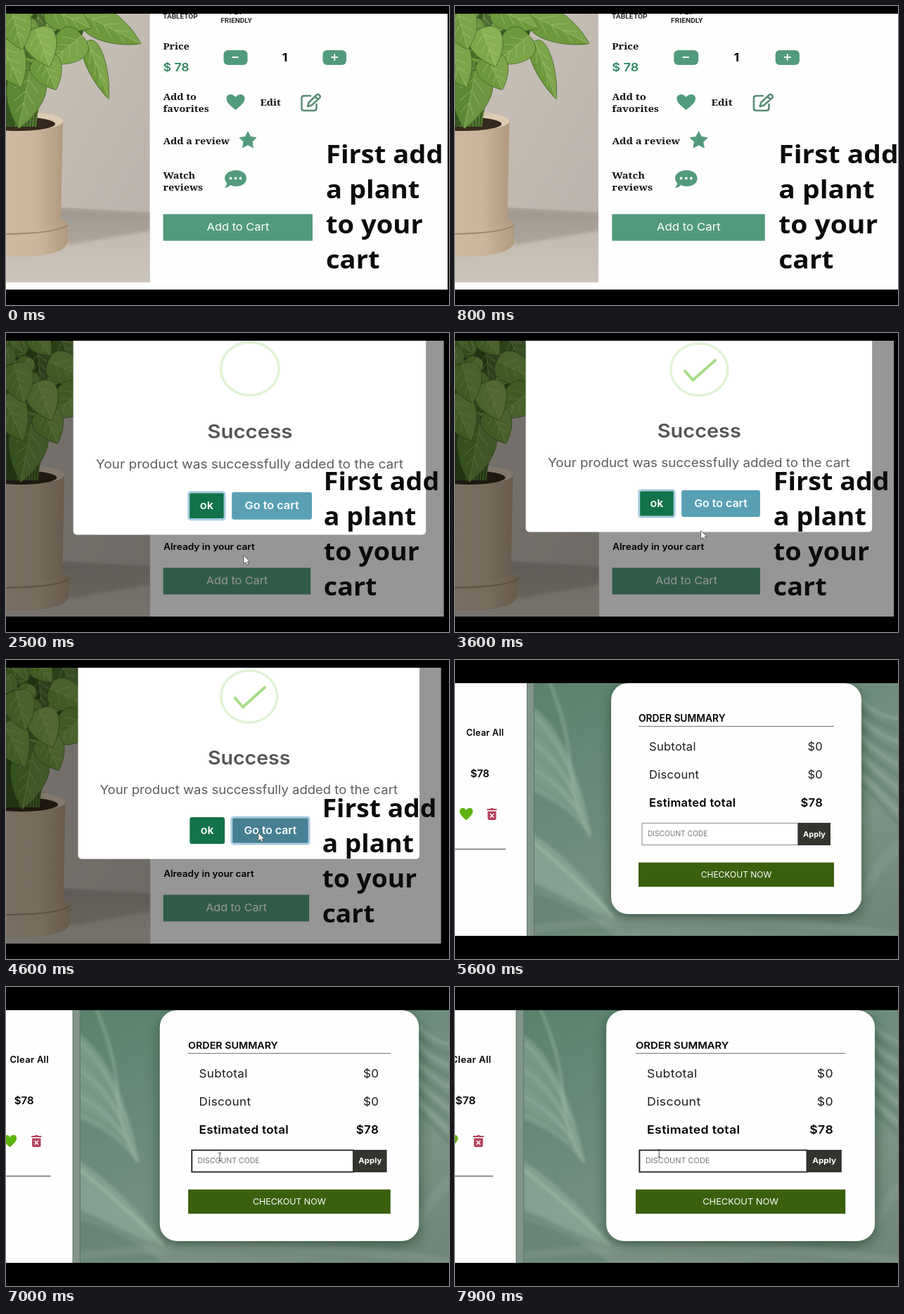
Recreate the animation shown at these times as an HTML page. Size 630 by 426 pixels, loop 8000 ms.

```html
<!DOCTYPE html>
<html lang="en">
<head>
<meta charset="utf-8">
<title>Plant shop</title>
<style>
  html, body { margin: 0; width: 100%; height: 100%; overflow: hidden; background: #000; }
  svg { display: block; }
  text { font-family: Inter, sans-serif; }
  #shop text { transform-box: fill-box; transform-origin: left; transform: scaleX(1.09); }
  #shop .mid text, #shop text.mid { transform-origin: center; }
  .serif text { font: bold 13.1px "Noto Serif", serif; fill: #111; }
  .tag text { font: bold 9.2px Roboto, sans-serif; fill: #2a2a2a; }
  .caption text { font: bold 35px "Open Sans", sans-serif; fill: #0b0b0b; }
  .mid { text-anchor: middle; }
  .end { text-anchor: end; }
  .bold { font-weight: 600; }
  .row { font-size: 16.5px; letter-spacing: .3px; fill: #1c1c1c; }
  .row .bold { fill: #000; }
</style>
</head>
<body>
<svg width="630" height="426" viewBox="0 0 630 426">
  <defs>
    <clipPath id="shopClip"><rect x="-30" y="11" width="658" height="393"/></clipPath>
    <clipPath id="cartClip"><rect x="-30" y="33" width="700" height="360"/></clipPath>
    <clipPath id="photoClip"><rect x="-30" y="-40" width="234.5" height="433.5"/></clipPath>
    <linearGradient id="wall" x1="0" x2="1" y1="0" y2="1">
      <stop offset="0" stop-color="#cdc6bd"/><stop offset="1" stop-color="#b9b1a9"/>
    </linearGradient>
    <linearGradient id="floor" x1="0" x2="0" y1="0" y2="1">
      <stop offset="0" stop-color="#b0a8a0"/><stop offset=".4" stop-color="#c4bcb2"/><stop offset="1" stop-color="#cbc4bb"/>
    </linearGradient>
    <linearGradient id="clay" x1="0" x2="1" y1="0" y2="0">
      <stop offset="0" stop-color="#cfbda4"/><stop offset=".65" stop-color="#c9b59b"/><stop offset="1" stop-color="#b09a80"/>
    </linearGradient>
    <linearGradient id="foliage" x1="0" x2="1" y1="0" y2="1">
      <stop offset="0" stop-color="#547f65"/><stop offset=".35" stop-color="#68897a"/>
      <stop offset=".7" stop-color="#7b9385"/><stop offset="1" stop-color="#6b8275"/>
    </linearGradient>
    <filter id="soft" x="-30%" y="-30%" width="160%" height="160%"><feGaussianBlur stdDeviation="2"/></filter>
    <filter id="cardShadow" x="-20%" y="-20%" width="140%" height="140%"><feGaussianBlur stdDeviation="9"/></filter>
    <path id="heart" d="M0 11C-5 7-13 1-13-5C-13-12-4-13 0-7C4-13 13-12 13-5C13 1 5 7 0 11Z"/>
  </defs>

  <g id="shop">
    <g clip-path="url(#shopClip)">
      <rect x="-30" y="10" width="660" height="394" fill="#fefefe"/>
      <g id="photo" clip-path="url(#photoClip)">
        <rect x="-30" y="-40" width="235" height="434" fill="url(#wall)"/>
        <path d="M-30 284L80 287L205 294V394H-30Z" fill="url(#floor)"/>
        <path d="M70 289L205 295V320L90 340Z" fill="#8d857d" opacity=".45" filter="url(#soft)"/>
        <path d="M-30 306H80Q88 306 88 314V336Q84 356 20 357H-30Z" fill="url(#clay)"/>
        <path d="M-30 325Q70 326 88 312" fill="none" stroke="#9c866c" stroke-width="2"/>
        <path d="M-30 163H81L78 306Q60 321-30 322Z" fill="url(#clay)"/>
        <ellipse cx="20" cy="164" rx="61" ry="13.500" fill="#dccbb5"/>
        <ellipse cx="18" cy="168" rx="52" ry="10" fill="#35281d"/>
        <g id="plant"></g>
      </g>

      <g class="tag mid">
        <text x="248" y="18.5">TABLETOP</text>
        <text x="327" y="12.5">PET</text>
        <text x="327.5" y="24.5">FRIENDLY</text>
      </g>
      <g class="serif">
        <text x="223.5" y="62">Price</text>
        <text x="223.5" y="134">Add to</text>
        <text x="223.5" y="151">favorites</text>
        <text x="361.5" y="142">Edit</text>
        <text x="223.5" y="197">Add a review</text>
        <text x="223.5" y="246">Watch</text>
        <text x="223.5" y="263">reviews</text>
      </g>
      <text x="223.5" y="93" class="bold" font-size="16.200" fill="#2f8560">$ 78</text>
      <text x="396.5" y="79" class="mid" font-weight="700" font-size="16">1</text>
      <g fill="#529a7c">
        <rect x="309.5" y="63" width="34" height="21" rx="6"/>
        <rect x="450.5" y="63" width="33.5" height="21" rx="6"/>
        <use href="#heart" x="326.5" y="137"/>
        <path id="star" stroke="#529a7c" stroke-linejoin="round"/>
        <path d="M327 234C336 234 342 239 342 245.500C342 252 336 257 327 257Q322 257 319 255Q316 259 311 259Q314 256 314 252Q311 249 311 245.500C311 239 318 234 327 234Z"/>
      </g>
      <path d="M321.500 73H330.500M462.500 73H472M467.250 68.300V77.700" stroke="#fff" stroke-width="1.800"/>
      <g fill="#fff"><circle cx="319.500" cy="245.500" r="1.900"/><circle cx="326.500" cy="245.500" r="1.900"/><circle cx="333.500" cy="245.500" r="1.900"/></g>
      <g fill="none" stroke="#5a8c76" stroke-width="2.500" stroke-linejoin="round">
        <path d="M434 128H424Q420.500 128 420.500 131V146Q420.500 149 424 149H438Q441.500 149 441.500 146V139"/>
        <path d="M429 143L430.500 137.500L442 126.500Q443.500 125 445 126.500L446.500 128Q447.500 129.500 446 131L434.500 141.500ZM439.500 129L443.500 133"/>
      </g>

      <text id="already" x="224" y="309.500" class="bold" font-size="12.700">Already in your cart</text>
      <rect id="addButton" x="223.500" y="296.500" width="212.500" height="38" fill="#529a7c"/>
      <g id="addLabel"><text x="330" y="320.500" class="mid" font-size="15.100" fill="#fff">Add to Cart</text></g>

      <rect id="shade" x="-30" y="10" width="660" height="394"/>
      <g id="modal">
        <rect x="99.300" y="-93" width="497.500" height="376.500" rx="5" fill="#fff"/>
        <ellipse cx="348.500" cy="52" rx="41" ry="37" fill="none" stroke="#e1f3d6" stroke-width="3.500"/>
        <path id="tick" d="M327 53L339.500 67L372.500 38" pathLength="1" stroke-dasharray="1 2" fill="none" stroke="#a5dc86" stroke-width="4"/>
        <text x="348.500" y="149" class="bold mid" font-size="26.800" fill="#555">Success</text>
        <text x="348" y="191" class="mid" font-size="17.400" fill="#5c5c5c">Your product was successfully added to the cart</text>
        <rect id="okButton" x="262" y="224" width="51" height="38" rx="3" fill="#12724a" stroke="#a9cbe0"/>
        <rect id="goButton" x="323" y="224" width="113" height="38" rx="3" stroke="#a9cbe0"/>
        <g class="bold mid" font-size="14.800" fill="#fff">
          <text x="287.500" y="248">ok</text>
          <text x="379.500" y="248">Go to cart</text>
        </g>
      </g>
      <path id="arrow" d="M0 0V12L3 9.500L5 13.500L7 12.500L5.200 8.800H9Z" fill="#fff" stroke="#444" stroke-width=".8"/>
    </g>
    <g class="caption">
      <text x="455" y="224">First add</text>
      <text x="455" y="274">a plant</text>
      <text x="455" y="324">to your</text>
      <text x="455" y="374">cart</text>
    </g>
  </g>

  <g id="cart">
    <g clip-path="url(#cartClip)">
      <rect x="-30" y="33" width="700" height="360" fill="url(#foliage)"/>
      <g id="fronds" filter="url(#soft)"></g>
      <rect x="101" y="33" width="12" height="360" fill="#81958a"/>
      <path d="M102.500 33V393M112.500 33V393" stroke="#5f7368"/>
      <rect x="-30" y="33" width="132" height="360" fill="#fefefe"/>
      <text x="16" y="108" class="bold" font-size="12.500" letter-spacing=".3">Clear All</text>
      <text x="22" y="167" class="bold" font-size="14.500">$78</text>
      <use href="#heart" transform="translate(16 219.500) scale(.72 .8)" fill="#5fb30d"/>
      <g fill="#b5435d">
        <path d="M45.500 212H50L51 211H54L55 212H59.500V214H45.500ZM46.500 215.500H58.500V226Q58.500 228 56.500 228H48.500Q46.500 228 46.500 226Z"/>
        <path d="M50 219L55 224.500M55 219L50 224.500" stroke="#fff" stroke-width="1.500"/>
      </g>
      <path d="M-30 269.500H72" stroke="#8c8c8c" stroke-width="2"/>

      <rect x="223" y="40" width="355" height="327" rx="24" fill="#16301f" opacity=".6" filter="url(#cardShadow)"/>
      <rect x="222" y="33" width="356" height="329" rx="24" fill="#fefefe"/>
      <text x="261" y="88" class="bold" font-size="13.800">ORDER SUMMARY</text>
      <path d="M261 94.500H539" stroke="#777"/>
      <g class="row">
        <text x="276" y="129">Subtotal</text><text x="523" y="129" class="end">$0</text>
        <text x="276" y="169">Discount</text><text x="523" y="169" class="end">$0</text>
        <text x="276" y="209" class="bold">Estimated total</text><text x="523" y="209" class="end bold">$78</text>
      </g>
      <rect id="field" x="266" y="232.500" width="222" height="31" fill="#fff"/>
      <text x="274" y="251" font-size="10.200" fill="#757575">DISCOUNT CODE</text>
      <rect x="487.500" y="232" width="46.500" height="32" fill="#33342e"/>
      <text x="511" y="251.500" class="mid" font-size="11" font-weight="700" fill="#fff">Apply</text>
      <rect x="261" y="288.500" width="278" height="34.500" fill="#3a5f0d"/>
      <text x="400" y="310" class="mid" font-size="12" fill="#fff">CHECKOUT NOW</text>
      <path id="beam" d="M-2-5.500H2M0-5.500V5.500M-2 5.500H2" stroke="#555" fill="none"/>
    </g>
  </g>
</svg>

<script>
const LOOP = 8000, STEP = 100, CUT = 5000, OPEN = 2336;
const $ = id => document.getElementById(id);
const set = (id, attrs) => {
  for (const key in attrs) $(id).setAttribute(key, attrs[key]);
};
const show = (id, on) => set(id, { visibility: on ? "visible" : "hidden" });
const smooth = u => u * u * (3 - 2 * u);
const clamp = u => Math.max(0, Math.min(1, u));

// Value of column `col` in a table of [time, ...values] rows.
function track(rows, t, ease = smooth, col = 1) {
  if (t <= rows[0][0]) return rows[0][col];
  for (let i = 1; i < rows.length; i++) {
    const a = rows[i - 1], b = rows[i];
    if (t <= b[0]) return a[col] + (b[col] - a[col]) * ease((t - a[0]) / (b[0] - a[0]));
  }
  return rows[rows.length - 1][col];
}

let seed = 11;
const random = () => (seed = (seed * 16807) % 2147483647) / 2147483647;

const greens = ["#36551f", "#486f28", "#5c8733", "#6d993c", "#7ea848"];
function leaf(x, y, len, angle, w, tone) {
  const top = `M0 0C${-len * .05} ${-w * 1.4} ${len * .6} ${-w * 1.1} ${len} 0`;
  const low = `C${len * .6} ${w * 1.1} ${-len * .05} ${w * 1.4} 0 0`;
  const veins = [.15, .35, .55].map(k =>
    `M${len * k} 0l${len * .2} ${-w * .7 * (1 - k)}M${len * k} 0l${len * .2} ${w * .7 * (1 - k)}`).join("");
  return `<g transform="translate(${x} ${y}) rotate(${angle})">
    <path d="${top}${low}Z" fill="${greens[tone]}" stroke="#3a5a20" stroke-width=".7"/>
    <path d="${top}Z" fill="#c4dd8f" opacity=".16"/>
    <path d="M0 0H${len}${veins}" fill="none" stroke="#bcd588" opacity=".45"/></g>`;
}

function drawPlant() {
  let out = `<path d="M-30-40H118Q120 30 98 62Q64 88 50 125L42 172H-30Z" fill="#38561f"/>`;
  for (let i = 0; i < 8; i++) {
    out += `<path d="M${14 + i * 4} 172Q${18 + i * 4} 120 ${i * 12 - 10} 50" fill="none" stroke="#5c8038" stroke-width="2"/>`;
  }
  for (let i = 0; i < 30; i++) {
    const y = random() * 110 - 50;
    const x = random() * (100 - Math.max(0, y) * .4) - 22;
    out += leaf(x, y, 32 + random() * 24, 30 + random() * 110, 14 + random() * 9, Math.floor(random() * 4));
  }
  const front = [
    [110, 12, 92, 27, 24, 3], [116, 50, 88, 70, 15, 3], [58, 2, 70, 25, 24, 3],
    [108, 42, 62, 140, 27, 3], [34, 92, 84, 101, 30, 2], [50, 72, 52, 66, 24, 3],
    [-8, 52, 70, 65, 28, 3], [42, 32, 58, 70, 25, 4], [8, 6, 58, 75, 25, 3]
  ];
  $("plant").innerHTML = out + front.map(f => leaf(...f)).join("");
}

function drawFronds() {
  const line = (d, color, w, o) => `<path d="${d}" fill="none" stroke="${color}" stroke-width="${w}" opacity="${o}"/>`;
  const blade = (d, color, o) => `<path d="${d}Z" fill="${color}" opacity="${o}"/>`;
  let out = blade("M100 60C150 85 180 170 194 252C165 215 135 195 100 185", "#8fab99", .55);
  out += blade("M100 240C150 270 200 325 228 369C180 355 135 325 100 312", "#93ad9d", .6);
  out += blade("M100 330Q170 345 225 393H100", "#5c7a69", .5);
  for (let i = 0; i < 6; i++) {
    out += line(`M100 ${70 + i * 20}Q160 ${110 + i * 17} ${192 - i * 2} ${250 - i * 4}`, i % 2 ? "#5d8069" : "#aec5b5", 2.5, .45);
  }
  out += line("M130 20Q160 90 164 150T192 250", "#a9c1b0", 3, .6);
  out += line("M100 250Q160 300 228 368", "#b3c8ba", 3, .6);
  out += line("M100 385Q350 350 650 395", "#8a9f94", 12, .4);
  for (let i = 0; i < 10; i++) {
    out += line(`M565 ${40 + i * 14}Q600 ${95 + i * 11} 660 ${80 + i * 21}`, i % 2 ? "#577764" : "#a3b9aa", 4, .5);
  }
  out += line("M575 340Q610 270 660 250", "#8aa194", 16, .35);
  $("fronds").innerHTML = out;
}

function drawStar() {
  const points = Array.from({ length: 10 }, (_, i) => {
    const r = i % 2 ? 6.3 : 12.6, a = i * Math.PI / 5;
    return `${344 + r * Math.sin(a)} ${191.5 - r * Math.cos(a)}`;
  });
  set("star", { d: `M${points.join("L")}Z` });
}

const shopStretch = [[0, 1], [1600, 1.047], [2500, .986], [3600, .99], [4600, .976]];
const arrowPath = [[1650, 400, 425], [2150, 337, 315], [2500, 339.5, 317], [3000, 339.5, 317], [4200, 362, 246]];
const beamPath = [[6000, 420, 400], [6700, 304.5, 242], [7100, 304.5, 242], [7800, 292, 237]];
const popIn = [[0, .7], [135, 1.05], [240, .95], [300, 1]];

const stretch = (s, x) => `matrix(${s} 0 0 1 ${x * (1 - s)} 0)`;
const moveTo = (path, t) => `translate(${track(path, t, smooth, 1)} ${track(path, t, smooth, 2)})`;

function drawShop(t) {
  const added = t >= 2300;
  const shift = `translate(0 ${added ? 38 : 0})`;
  set("shop", { transform: stretch(track(shopStretch, t), 232) });
  for (const id of ["photo", "addButton", "addLabel"]) set(id, { transform: shift });
  show("already", added);
  set("shade", { opacity: .41 * clamp((t - OPEN) / 100) });

  const pop = track(popIn, t - OPEN, u => u);
  show("modal", t >= OPEN);
  set("modal", { transform: `translate(348 100) scale(${pop}) translate(-348 -100)` });
  const drawn = clamp((t - OPEN - 400) / 220);
  set("tick", { "stroke-dashoffset": 1 - drawn, opacity: drawn > 0 ? 1 : 0 });
  const pressed = t >= 4500;
  set("okButton", { "stroke-width": pressed ? 0 : 3 });
  set("goButton", { "stroke-width": pressed ? 3 : 0, fill: t >= 4100 ? "#477f93" : "#59a0b5" });
  set("arrow", { transform: moveTo(arrowPath, t) });
}

function drawCart(t) {
  const u = (t - 5600) / 1000;
  set("cart", { transform: stretch(1 + .0146 * u + .0074 * u * u, 316) });
  const focused = t >= 6800;
  set("field", { stroke: focused ? "#222" : "#999", "stroke-width": focused ? 1.8 : 1.2 });
  set("beam", { transform: moveTo(beamPath, t) });
}

function render(now) {
  const t = Math.floor((now % LOOP) / STEP) * STEP;
  const inShop = t < CUT;
  set("shop", { display: inShop ? "inline" : "none" });
  set("cart", { display: inShop ? "none" : "inline" });
  inShop ? drawShop(t) : drawCart(t);
}

drawPlant();
drawFronds();
drawStar();
const start = performance.now();
function loop() {
  render(performance.now() - start);
  requestAnimationFrame(loop);
}
loop();
</script>
</body>
</html>
```
